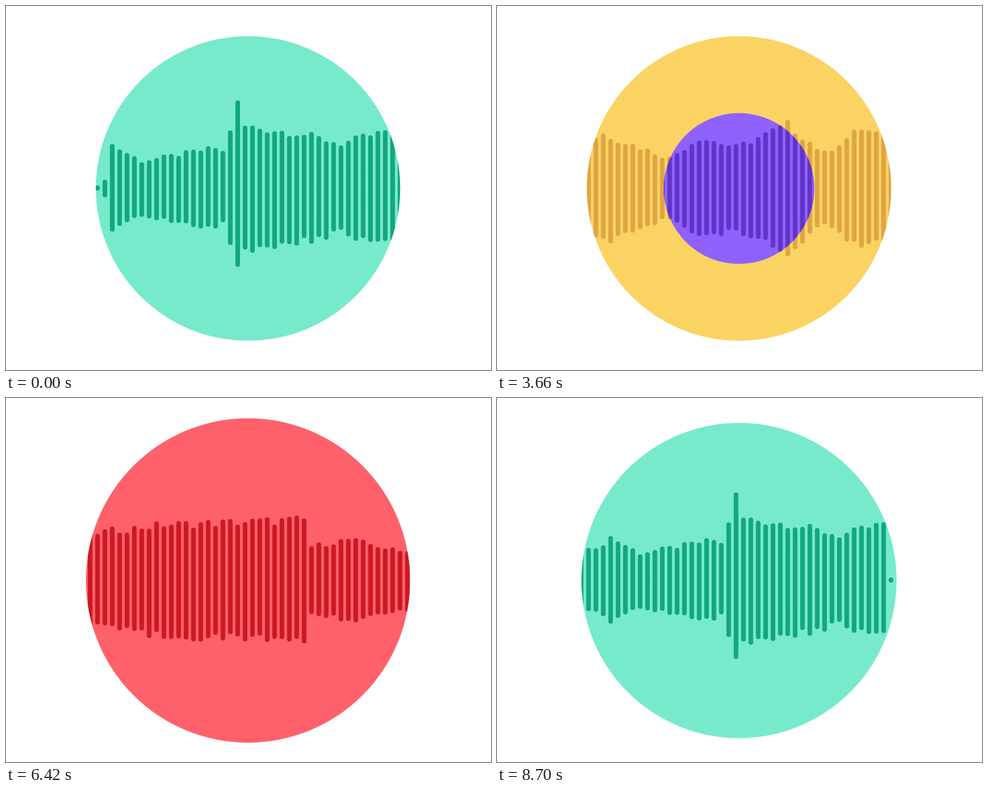
Recreate the animation shown at these times as an HTML page with a canvas. Size 800 by 600 pixels, loop 8760 ms.

```html
<!DOCTYPE html>
<html lang="en">
<head>
<meta charset="utf-8">
<title>Voice wave</title>
<style>
html, body { margin: 0; width: 100%; height: 100%; overflow: hidden; background: #fff; }
canvas { display: block; }
</style>
</head>
<body>
<canvas id="stage" width="800" height="600"></canvas>
<script>
const ctx = document.getElementById('stage').getContext('2d');

const LOOP = 8760, STEP = 60, GROW = 900, SETTLE = 300;
const RADIUS = 251, PEAK = 276.2, CX = 399.2, CY = 300.8;
const BARS = 163, SHOWN = 41, GAP = 12.17, LEFT = 150.95, MID = 300.2, WIDTH = 7.6;

const green = { fill: '#77eacc', bar: '#12a77e' };
const yellow = { fill: '#fbd363', bar: '#e0a443' };
const purple = { fill: '#8f62fe', bar: '#6034c9' };
const red = { fill: '#fe616a', bar: '#cc1822' };
const cues = [[1080, yellow], [3240, purple], [5400, red], [7620, green]];

// Key points of the loudness curve: bar, half height
const curve = [
  [0, 4], [1, 15], [2, 72], [6, 45], [16, 67], [17, 60], [18, 98], [19, 139], [20, 102],
  [27, 92], [33, 74], [39, 94], [44, 67], [51, 94], [52, 120], [54, 113], [55, 80],
  [61, 82], [64, 55], [70, 90], [79, 50], [83, 84], [88, 68], [95, 105], [100, 58],
  [105, 99], [108, 86], [112, 120], [114, 72], [128, 92], [147, 100], [148, 56],
  [153, 68], [160, 48], [164, 58]
];

const ease = p => p * p * (3 - 2 * p);

function noise(seed) {
  const v = Math.sin(seed * 12.9898) * 43758.5453;
  return (v - Math.floor(v)) * 2 - 1;
}

function loudness(n) {
  const k = curve.findIndex(point => point[0] >= n);
  if (k === 0) return curve[0][1];
  const [n0, h0] = curve[k - 1], [n1, h1] = curve[k];
  return h0 + (h1 - h0) * (n - n0) / (n1 - n0);
}

// Extent of a bar above and below the axis
function extent(n) {
  if (n > BARS + 1) n = n === BARS + SHOWN - 1 ? 0 : n - BARS;
  const h = loudness(n);
  return [h * (1 + 0.08 * noise(n + 1)), h * (1 + 0.08 * noise(n + 500))];
}

function radiusAt(age) {
  if (age < GROW) return PEAK * ease(age / GROW);
  return PEAK + (RADIUS - PEAK) * ease(Math.min(1, (age - GROW) / SETTLE));
}

function drawDisc(r, look, offset) {
  ctx.save();
  ctx.beginPath();
  ctx.arc(CX, CY, r, 0, Math.PI * 2);
  ctx.fillStyle = look.fill;
  ctx.fill();
  ctx.clip();
  ctx.beginPath();
  const from = Math.max(0, offset - 2);
  const to = Math.min(BARS + SHOWN - 1, offset + SHOWN + 2);
  for (let n = from; n <= to; n++) {
    const [up, down] = extent(n);
    const x = LEFT + (n - offset) * GAP;
    ctx.roundRect(x - WIDTH / 2, MID - up, WIDTH, up + down, WIDTH / 2);
  }
  ctx.fillStyle = look.bar;
  ctx.fill();
  ctx.restore();
}

function draw(now) {
  const t = Math.floor((now % LOOP) / STEP) * STEP;
  const offset = Math.round(t / LOOP * BARS);
  ctx.fillStyle = '#fff';
  ctx.fillRect(0, 0, 800, 600);

  // Only the newest settled disc and the one growing over it are visible
  const discs = [[RADIUS, green]];
  for (const [start, look] of cues) {
    if (t > start) discs.push([radiusAt(t - start), look]);
  }
  const last = discs.length - 1;
  const first = discs[last][0] < RADIUS ? last - 1 : last;
  discs.slice(first).forEach(([r, look]) => drawDisc(r, look, offset));
}

let origin;
function tick(now) {
  if (origin === undefined) origin = now;
  draw(now - origin);
  requestAnimationFrame(tick);
}
draw(0);
requestAnimationFrame(tick);
</script>
</body>
</html>
```
